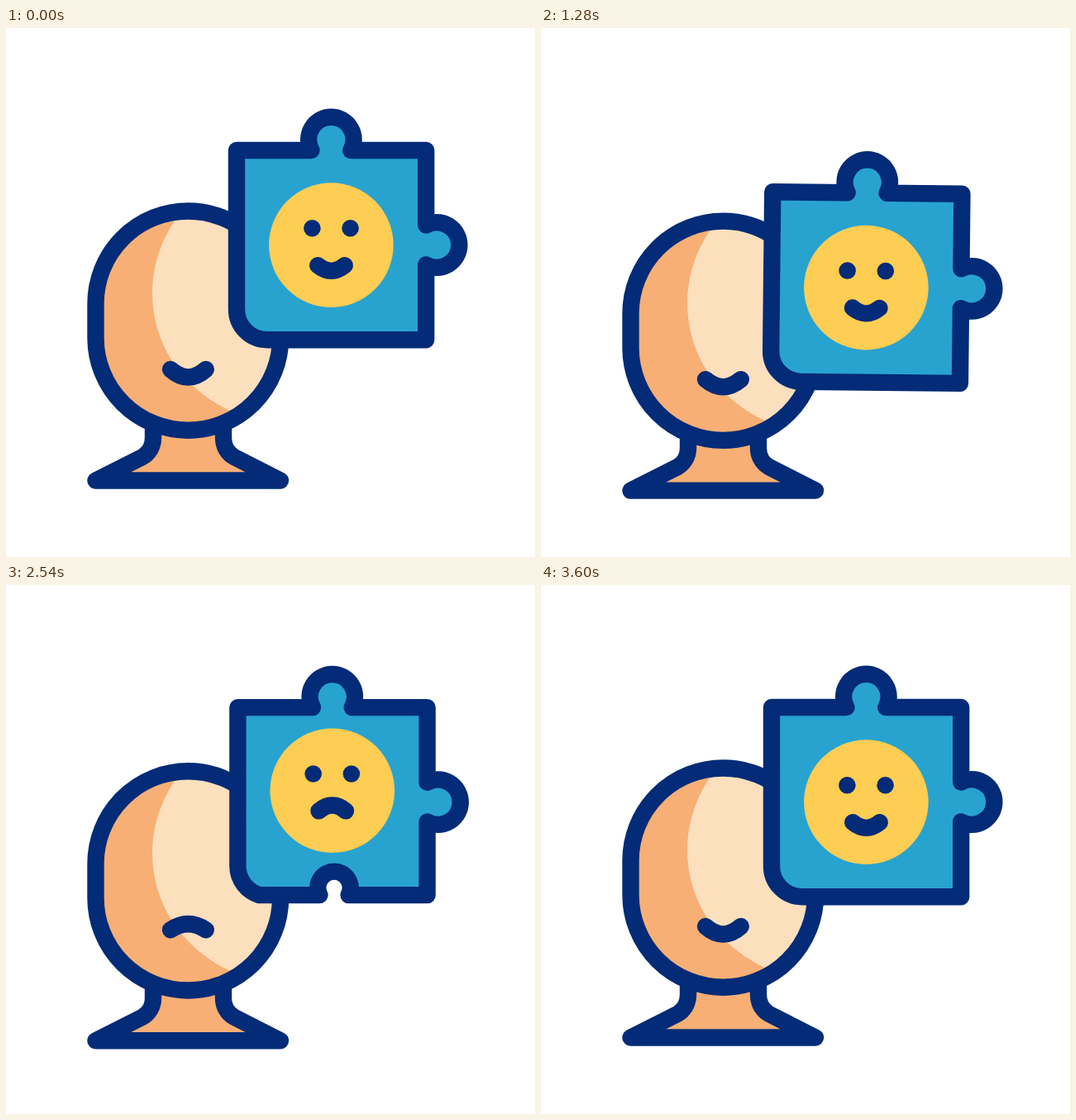
Write an HTML page that moves like this. It is 640 px wide and 640 px high and loops after 3.62 s.

```html
<!DOCTYPE html>
<html lang="en">
<head>
<meta charset="utf-8">
<title>Mood puzzle</title>
<style>
  html, body { margin: 0; width: 100%; height: 100%; overflow: hidden; background: #fff; }
  svg { display: block; width: 100vw; height: 100vh; }
  .line { stroke: #032b77; stroke-width: 20.4; stroke-linecap: round; stroke-linejoin: round; }
  .open { fill: none; }
  .skin { fill: #f7af75; }
  .light { fill: #fcdfbd; }
  .tile { fill: #28a3cf; }
  .face { fill: #fecd53; }
  .eye { fill: #032b77; }
</style>
</head>
<body>
<svg viewBox="0 0 640 640">
  <defs>
    <clipPath id="skull"><rect x="108.5" y="221.5" width="223.6" height="265.2" rx="111.8"/></clipPath>
  </defs>
  <g id="head">
    <path class="line skin" d="M178 482V496C178 507 172 515 165 519L108.5 547.5H332L276 519C269 515 263 507 263 496V482"/>
    <rect class="skin" x="108.5" y="221.5" width="223.6" height="265.2" rx="111.8"/>
    <path class="light" clip-path="url(#skull)" d="M212 222C190 250 177 285 177 320C177 390 222 445 283 468L340 490V215Z"/>
    <rect class="line open" x="108.5" y="221.5" width="223.6" height="265.2" rx="111.8"/>
    <path id="mouth" class="line open"/>
  </g>
  <g id="happy">
    <path class="line tile" d="M279 148H369.5A27.2 27.2 0 1 1 417.3 148H508.2V238.6A27.2 27.2 0 1 1 508.2 286.4V377.2H316A37 37 0 0 1 279 340.2Z"/>
    <circle class="face" cx="393.4" cy="262.6" r="75.3"/>
    <circle class="eye" cx="370.4" cy="242.3" r="10.3"/>
    <circle class="eye" cx="416.6" cy="242.3" r="10.3"/>
    <path class="line open" d="M377.2 287.2Q393.5 300.5 409.8 287.2"/>
  </g>
  <g id="sad">
    <path class="line tile" d="M280.4 148H370.9A27.2 27.2 0 1 1 418.7 148H509.6V238.6A27.2 27.2 0 1 1 509.6 286.4V375H414.6A19.7 19.7 0 1 0 379.4 375H306.6A37 37 0 0 1 280.4 339.8Z"/>
    <circle class="face" cx="394.8" cy="248.6" r="75.3"/>
    <circle class="eye" cx="371.7" cy="228.3" r="10.3"/>
    <circle class="eye" cx="417.9" cy="228.3" r="10.3"/>
    <path class="line open" d="M378.5 273.2Q394.8 259.6 411 273.2"/>
  </g>
</svg>
<script>
const LOOP = 3620, STEP = 20, END = 3600, BOB = 900;
const el = id => document.getElementById(id);
const head = el('head'), mouth = el('mouth'), happy = el('happy'), sad = el('sad');

const ease = u => u * u * (3 - 2 * u);

// Eased value through [time, value] keys; equal times make a jump.
function track(keys, t) {
  if (t <= keys[0][0]) return keys[0][1];
  for (let i = 1; i < keys.length; i++) {
    const [t0, a] = keys[i - 1], [t1, b] = keys[i];
    if (t < t1) return a + (b - a) * ease((t - t0) / (t1 - t0));
  }
  return keys[keys.length - 1][1];
}

const happyY = [[0, 0], [400, -13], [800, 0], [1200, -13], [1600, 607], [3200, 607], [3200, -420], [3600, 0]];
const happyTurn = [[1200, 0], [1600, 6], [3200, 6], [3200, 0]];
const sadY = [[1240, -420], [1640, 1], [2040, -10], [2440, 1], [3140, -14], [3540, 606]];
const sadTurn = [[3140, 0], [3540, 6]];
const frown = [[1240, 0], [1640, 1], [3200, 1], [3600, 0]];

function place(node, y, turn, cx) {
  node.setAttribute('transform', `translate(0 ${y}) rotate(${turn} ${cx} 262.6)`);
}

function draw(ms) {
  const t = Math.min(END, Math.floor((ms % LOOP) / STEP) * STEP);
  const half = (t % BOB) / (BOB / 2);
  const bob = 13 * ease(half < 1 ? half : 2 - half);
  head.setAttribute('transform', `translate(0 ${bob})`);

  const f = track(frown, t);
  const y = 413 + 0.4 * f;
  mouth.setAttribute('d', `M199 ${y}Q220.4 ${432 - 32.7 * f} 241.8 ${y}`);

  place(happy, track(happyY, t), track(happyTurn, t), 393.4);
  place(sad, track(sadY, t), track(sadTurn, t), 394.8);
}

const start = performance.now();
function tick() {
  draw(performance.now() - start);
  requestAnimationFrame(tick);
}
tick();
</script>
</body>
</html>
```
